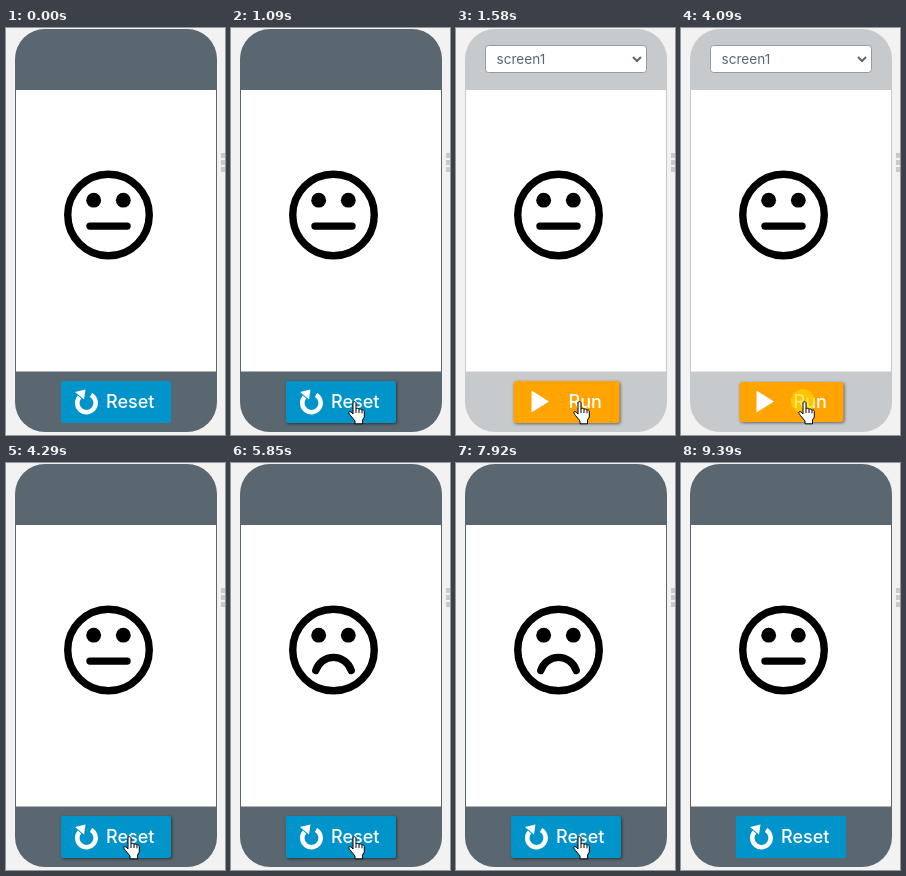
Animation, 219 px wide and 407 px high, one loop 9590 ms. Source, as an HTML page:

```html
<!DOCTYPE html>
<html lang="en">
<head>
<meta charset="utf-8">
<style>
  html, body { margin: 0; height: 100%; overflow: hidden; background: #f2f2f2; }
  svg { display: block; }
  text { font: 500 18px Inter, sans-serif; fill: #fff; }
  #picker text { font-size: 13.6px; font-weight: 400; fill: #5b6770; }
  .hover { filter: drop-shadow(1px 1.5px 1.5px rgba(0, 0, 0, .5)); }
</style>
</head>
<body>
<svg width="219" height="407" viewBox="0 0 219 407">
  <path d="M215 125h4v5h-4zm0 7h4v5h-4zm0 7h4v5h-4z" fill="#c9c9c9"/>
  <rect id="phone" x="9" y="1" width="202" height="403" rx="30"/>
  <path d="M10 62h200v281.500h-200z" fill="#fff"/>

  <g id="picker">
    <rect x="29.500" y="17.500" width="161" height="27" rx="3" fill="#fff" stroke="#949ca2"/>
    <text x="40.500" y="36">screen1</text>
    <path d="M177 29l4 4 4-4" fill="none" stroke="#5b6770" stroke-width="2"/>
  </g>

  <g transform="translate(102.500 187) scale(3.706)">
    <circle r="11" fill="none" stroke="#000" stroke-width="2"/>
    <circle cx="-4" cy="-4" r="2"/>
    <circle cx="4" cy="-4" r="2"/>
    <path id="mouth" fill="none" stroke="#000" stroke-width="2" stroke-linecap="round"/>
  </g>

  <g id="reset">
    <rect x="55" y="353" width="110" height="42" rx="2" fill="#0094ca"/>
    <path d="M85 367A9.200 9.200 0 1 1 73.500 369" fill="none" stroke="#fff" stroke-width="4.500"/>
    <path d="M69 364l10.500-2.500-1.500 10z" fill="#fff"/>
    <text x="100" y="380">Reset</text>
  </g>

  <g id="run" class="hover">
    <rect id="runBox" fill="#ffa400" rx="3"/>
    <path d="M75.500 362.500v22l17.500-11z" fill="#fff"/>
    <text x="112.500" y="380">Run</text>
  </g>

  <circle id="click" cx="122" cy="373" r="12" fill="#ffd800" fill-opacity=".6"/>
  <g id="cursor" stroke="#000" stroke-linejoin="round">
    <path fill="#fff" d="M6.500 .7C7.500 .7 8 1.300 8 2V8C8 7 11 7 11 8.500C11 7.500 14 8 14 9.300C14 8.400 16.300 8.800 16.300 10.300V16L14.500 19V22.800H7V20L2.500 14.500C1 12.500 .3 11.600 1 10.800C2.200 10 4 11.500 5 13V2C5 1.300 5.500 .7 6.500 .7Z"/>
    <path fill="none" d="M8 8v4M11 8.500v3.500M14 9.300v3"/>
  </g>
</svg>

<script>
const LOOP = 9590;
const el = id => document.getElementById(id);
const mouths = {
  neutral: 'M-5 3H5',
  happy: 'M-4.77 2.500A5 5 0 0 0 4.77 2.500',
  sad: 'M-4.77 5.500A5 5 0 0 1 4.77 5.500'
};
const moods = [
  [4710, 4910, 'happy'], [5850, 6310, 'sad'], [6970, 7370, 'happy'],
  [7920, 8190, 'sad'], [8650, 8980, 'happy']
];
const show = (id, on) => el(id).setAttribute('display', on ? 'inline' : 'none');
const set = (id, attrs) => {
  for (const name in attrs) el(id).setAttribute(name, attrs[name]);
};
const within = (t, from, to) => t >= from && t < to;
// Pointer positions are sampled every 70 ms.
const stepped = (t, start, count) =>
  Math.max(0, Math.min(1, (Math.floor((t - start) / 70) + 1) / count));

function render(t) {
  const editing = within(t, 1480, 4220);
  const enter = stepped(t, 330, 6);
  const settle = stepped(t, 950, 3);
  const x = 142 - 9 * enter - 10 * settle;
  const y = 406 - 22 * enter - 11 * settle;
  const pointer = within(t, 330, 9390);
  const inset = within(t, 4090, 4220) ? 1 : 0;
  const mood = moods.find(([from, to]) => within(t, from, to));

  set('phone', { fill: editing ? '#c6cacd' : '#5b6770' });
  show('picker', editing);
  show('run', editing);
  show('reset', !editing);
  el('reset').classList.toggle('hover', pointer && y < 395);
  set('runBox', { x: 57.5 + inset, y: 353 + inset, width: 106 - 2 * inset, height: 42 - 2 * inset });
  set('mouth', { d: mouths[mood ? mood[2] : 'neutral'] });
  show('click', within(t, 1380, 1580) || within(t, 4090, 4290));
  show('cursor', pointer);
  set('cursor', { transform: `translate(${x - 6} ${y})` });
}

const start = performance.now();
function tick() {
  render((performance.now() - start) % LOOP);
  requestAnimationFrame(tick);
}
tick();
</script>
</body>
</html>
```
